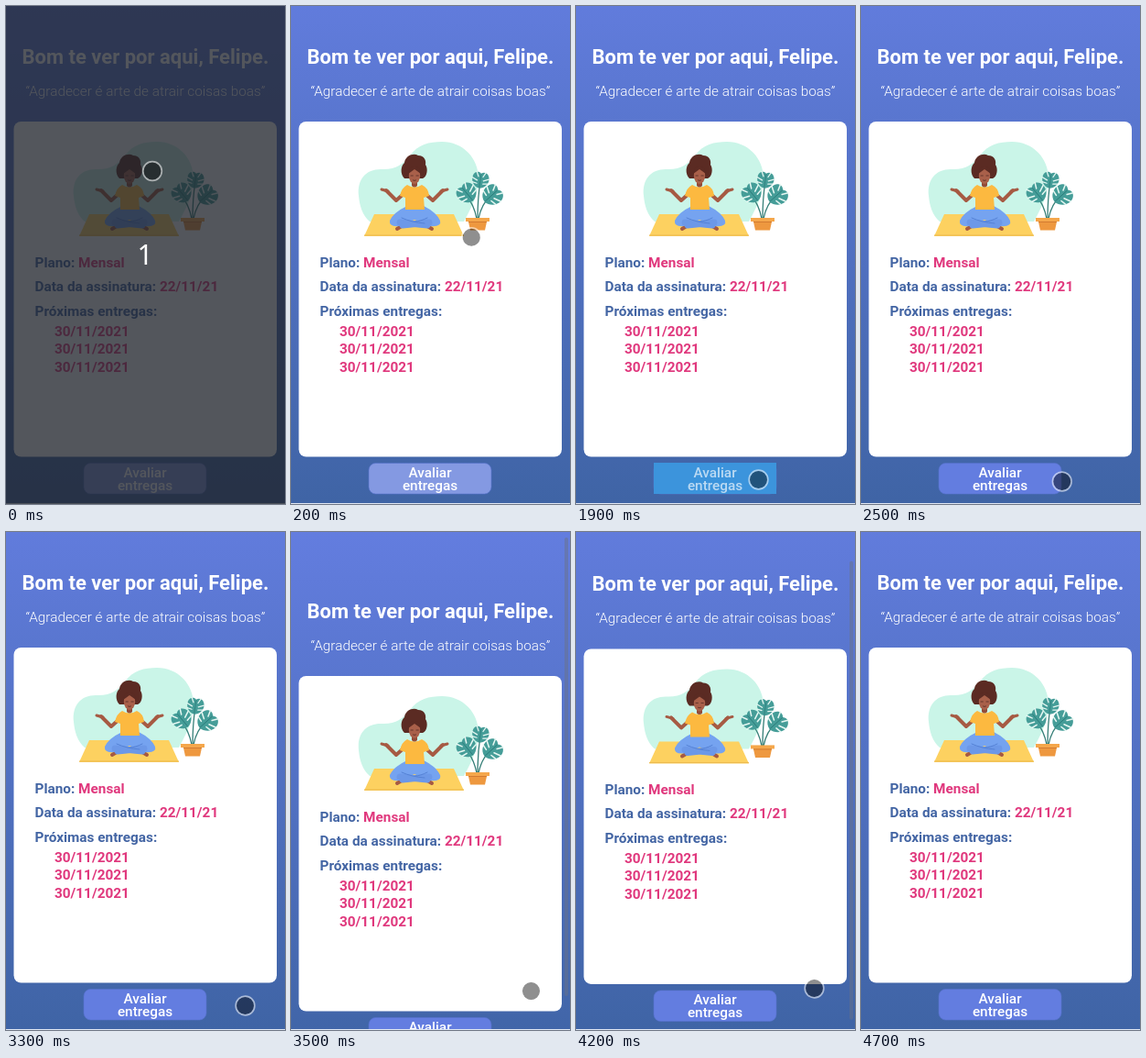
Animation of 305x543 px, one loop 5000 ms. Source, as an HTML page:

```html
<!DOCTYPE html>
<html lang="pt-BR">
<head>
<meta charset="utf-8">
<title>Assinatura</title>
<style>
  html, body { margin: 0; width: 100%; height: 100%; overflow: hidden; }
  svg { display: block; width: 100vw; height: 100vh; }
  text { font: 15.33px Roboto, Arial, sans-serif; fill: #fff; }
  .title { font-size: 22px; font-weight: 700; }
  .quote { font-weight: 300; text-anchor: middle; }
  .info { font-weight: 700; fill: #4365a4; }
  .value { fill: #e0387d; }
  .label { font-weight: 500; text-anchor: middle; }
  .count { font: 30px "Noto Sans", "Open Sans", sans-serif; text-anchor: middle; }
  .line { fill: none; stroke-linecap: round; stroke-linejoin: round; }
</style>
</head>
<body>
<svg viewBox="0 0 305 543" preserveAspectRatio="none">
  <defs>
    <linearGradient id="sky" x1="0" y1="0" x2="0" y2="1">
      <stop offset="0" stop-color="#637ddf"/>
      <stop offset="1" stop-color="#3f64a5"/>
    </linearGradient>
    <g id="leaf">
      <path d="M0 11C-8 10-12 2-10-5C-8-10-3-11 0-8C4-12 10-9 11-3C12 4 7 10 0 11Z" fill="#459d98"/>
      <path class="line" d="M0 10L0-7" stroke="#2c7c7b" stroke-width=".9"/>
      <path class="line" d="M-11-2L-4 1M-10 4L-4 5M-6-10L-3-4M11-2L4 1M10 4L4 5M6-10L3-4" stroke="#e6f7f2" stroke-width="1.5"/>
    </g>
  </defs>

  <g id="page">
    <rect y="-31" width="305" height="574" fill="url(#sky)"/>
    <text class="title" x="17.5" y="63">Bom te ver por aqui, Felipe.</text>
    <text class="quote" x="152.5" y="98">“Agradecer é arte de atrair coisas boas”</text>
    <rect x="8.5" y="126" width="287.5" height="365.5" rx="8" fill="#fff"/>

    <path d="M74 207C72 189 82 178 98 178C114 179 122 173 130 163C139 151 151 148 165 148C188 148 205 166 205 188C205 206 197 220 189 235H86C78 228 75 218 74 207Z" fill="#caf5e8"/>
    <path d="M91 227H178L189 251H80Z" fill="#fdd160"/>
    <path d="M80 250H189" stroke="#ebb950"/>

    <g id="woman">
      <path class="line" d="M124 204L115 212L104 201M146 204L155 212L166 201" stroke="#a65a43" stroke-width="4"/>
      <path class="line" d="M106 202L99 200M164 202L171 200" stroke="#a65a43" stroke-width="3"/>
      <path class="line" d="M121 240L116 243M149 240L154 243" stroke="#a65a43" stroke-width="4"/>
      <path d="M127 218Q112 225 108 234Q107 241 118 240L135 233L152 240Q165 241 163 234Q159 225 145 218Z" fill="#75a3f0"/>
      <path class="line" d="M119 236L149 239M151 236L122 239" stroke="#6c98e8" stroke-width="7"/>
      <path class="line" d="M121 231Q132 236 146 237M149 231Q141 235 136 235" stroke="#5582d6"/>
      <path d="M127 195Q135 200 143 195Q150 198 151 207L145 209L146 222H125L125 209L119 207Q121 198 127 195Z" fill="#fcb940"/>
      <path d="M132 190H138V196Q135 199 132 196Z" fill="#934c39"/>
      <path d="M124 188C119 183 120 174 124 171C125 163 134 160 139 163C146 163 148 169 147 173C150 177 149 186 144 188Z" fill="#5b2b23"/>
      <ellipse cx="135" cy="185" rx="6.2" ry="9" fill="#a9604a"/>
      <path d="M128 183Q129 174 135 175Q141 174 142 183Q138 180 135 178Q131 181 128 183Z" fill="#5b2b23"/>
      <path class="line" d="M131 185h2.3M137 185h2.3M133.5 190q1.5 1 3 0" stroke="#542a24" stroke-width=".8"/>
    </g>

    <g id="plant">
      <path class="line" d="M204 232Q204 210 207 191M203 232Q200 216 191 206M205 232Q208 216 219 206" stroke="#367f78" stroke-width="1.3"/>
      <use href="#leaf" transform="translate(207 189.5) rotate(8) scale(.85)"/>
      <use href="#leaf" transform="translate(192 204) rotate(-40)"/>
      <use href="#leaf" transform="translate(220 206) rotate(48) scale(1.03)"/>
      <path d="M193.5 233H214.5L212 244.5H196Z" fill="#ee983f"/>
      <path d="M191 231H217V235H191Z" fill="#f5a74b"/>
      <path d="M194 235.5H214" stroke="#d37b31"/>
    </g>

    <text class="info" x="31.5" y="285">Plano: <tspan class="value">Mensal</tspan></text>
    <text class="info" x="31.5" y="311">Data da assinatura: <tspan class="value">22/11/21</tspan></text>
    <text class="info" x="31.5" y="338">Próximas entregas:</text>
    <text class="info value" x="53" y="360">30/11/2021</text>
    <text class="info value" x="53" y="379">30/11/2021</text>
    <text class="info value" x="53" y="399">30/11/2021</text>

    <rect id="button" x="85" y="498.5" width="134" height="33.5" rx="7.5" stroke="#5872cf" stroke-width=".6"/>
    <rect id="tap" x="85" y="498" width="134" height="34" fill="#3c94dc"/>
    <g id="caption">
      <text class="label" x="152" y="513.5">Avaliar</text>
      <text class="label" x="152" y="528">entregas</text>
    </g>
  </g>

  <rect id="scrollbar" x="299" width="4" height="500" rx="2" fill="#6b7388"/>
  <rect y="542" width="305" height="1" fill="#dfe6f2"/>
  <g id="countdown">
    <rect width="305" height="543" fill="#20242b" opacity=".77"/>
    <text class="count" x="152" y="282">1</text>
  </g>
  <g id="cursor">
    <circle r="9.7" opacity=".44"/>
    <circle r="10.3" fill="none" stroke="#fff" stroke-opacity=".55" stroke-width="1.7"/>
  </g>
</svg>
<script>
  const LOOP = 5000, STEP = 100, PULL = 31;
  const PRESS = 1900, RELEASE = 3800;
  const ui = Object.fromEntries(
    ["page", "button", "tap", "caption", "scrollbar", "countdown", "cursor"]
      .map(id => [id, document.getElementById(id)]));

  // Pointer path: each move ends at `end` after lasting `span`, then rests.
  const origin = { x: 160, y: 180 };
  const moves = [
    { end: 400, span: 400, x: 234.5, y: 324.5 },
    { end: 800, span: 100, x: 234.5, y: 334.5 },
    { end: 1100, span: 100, x: 215.5, y: 464.5 },
    { end: 1200, span: 100, x: 276, y: 498 },
    { end: 1400, span: 200, x: 199.5, y: 516.5 },
    { end: 2600, span: 200, x: 240, y: 520.5 },
    { end: 3300, span: 400, x: 261.5, y: 516.5 },
    { end: 3500, span: 200, x: 262.5, y: 500.5 },
    { end: 4000, span: 200, x: 260.5, y: 497.5 }
  ];

  const ramp = (t, from, to) => Math.min(1, Math.max(0, (t - from) / (to - from)));

  function pointerAt(t) {
    return moves.reduce((p, { end, span, x, y }) => {
      const k = ramp(t, end - span, end);
      return { x: p.x + (x - p.x) * k, y: p.y + (y - p.y) * k };
    }, origin);
  }

  function set(el, attrs) {
    for (const name in attrs) el.setAttribute(name, attrs[name]);
  }

  function draw(now) {
    const t = Math.floor((now % LOOP) / STEP) * STEP;
    const pull = ramp(t, 3300, 3500);
    const scroll = PULL * pull * (1 - ramp(t, RELEASE, 4400)) ** 2.8;
    const glow = t < PRESS ? 0 : 1 - ramp(t, PRESS, PRESS + 200);
    const { x, y } = pointerAt(t);

    set(ui.page, { transform: `translate(0 ${scroll})` });
    set(ui.button, { fill: t < PRESS ? "#8499e2" : "#637de0" });
    set(ui.tap, { opacity: glow });
    set(ui.caption, { opacity: 1 - 0.35 * glow });
    set(ui.scrollbar, { y: 33 - 0.87 * scroll, opacity: 0.5 * pull * (1 - ramp(t, 4400, 4700)) });
    set(ui.cursor, { transform: `translate(${x} ${y})`, opacity: t < 4500 ? 1 : 0 });
    set(ui.countdown, { opacity: t < STEP ? 1 : 0 });
  }

  const start = performance.now();
  function tick() {
    draw(performance.now() - start);
    requestAnimationFrame(tick);
  }
  tick();
</script>
</body>
</html>
```
